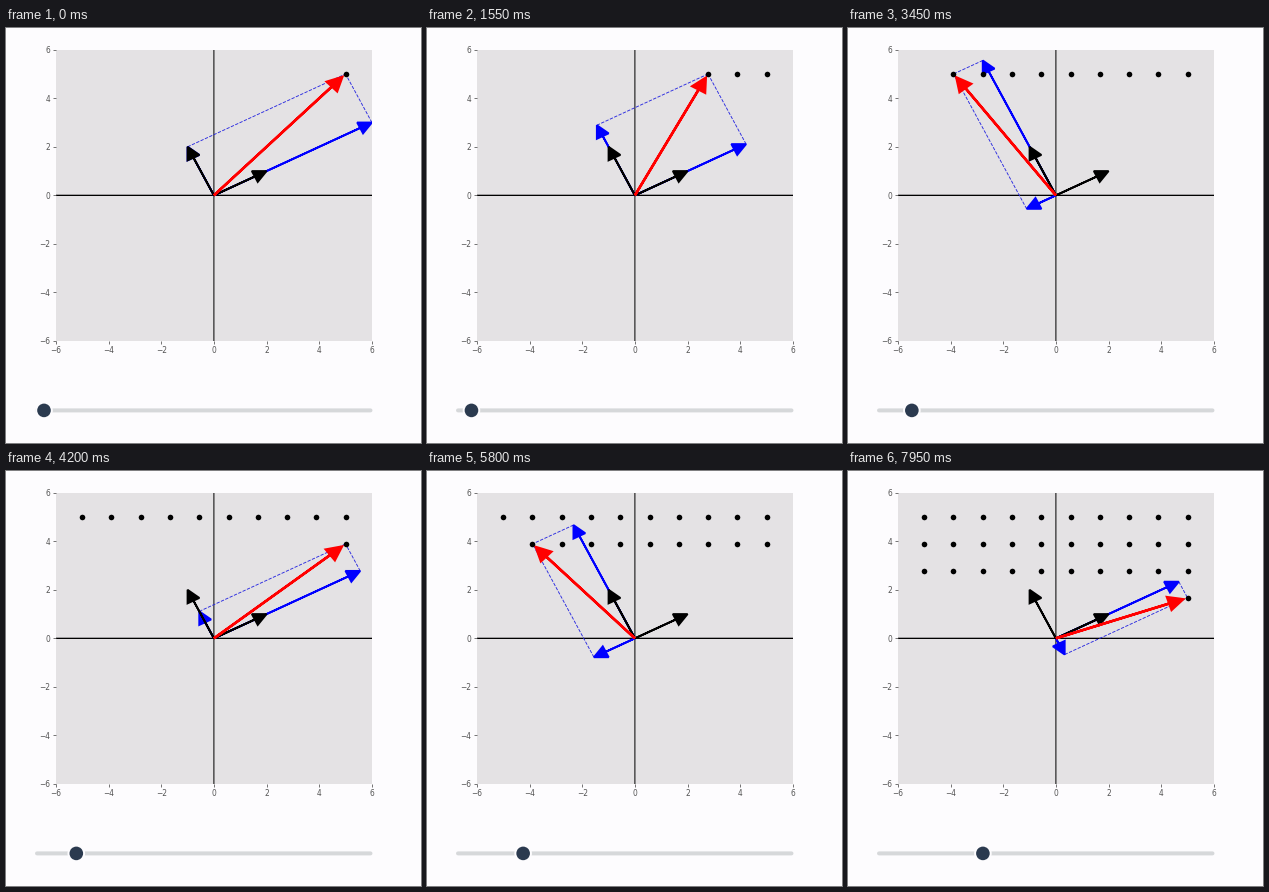
Write a matplotlib script that moves like this. It is 415 px wide and 415 px high and loops after 8000 ms.

```python
import numpy as np
import matplotlib.pyplot as plt
from matplotlib.animation import FuncAnimation
from matplotlib.patches import Circle, Polygon

SIZE, DPI = 415, 80
PX = 72 / DPI  # points per pixel
BACK = "#fdfcfe"
FRAMES, STEP = 160, 50

U, V = np.array([2.0, 1.0]), np.array([-1.0, 2.0])
side = np.linspace(5, -5, 10)
GRID = np.array([(x, y) for y in side for x in side])

# Slider progress: time in ms -> index of the current grid point
TIMES = [0, 750, 1650, 2600, 4200, 5100, 5800, 5950, 6750, 7650, 7850]
INDEX = [0, 1, 3, 6, 10, 13, 18, 19, 23, 29, 30]

fig = plt.figure(figsize=(SIZE / DPI, SIZE / DPI), dpi=DPI, facecolor=BACK)

# Whole-stage layer in pixel coordinates for the slider
stage = fig.add_axes([0, 0, 1, 1])
stage.set(xlim=(0, SIZE), ylim=(SIZE, 0))
stage.axis("off")

ax = fig.add_axes([49.9 / SIZE, 1 - 313.0 / SIZE, 316.0 / SIZE, 291.3 / SIZE])
ax.set(xlim=(-6, 6), ylim=(-6, 6), facecolor="#e4e2e4",
       xticks=range(-6, 7, 2), yticks=range(-6, 7, 2))
for spine in ax.spines.values():
    spine.set_visible(False)
ax.tick_params(length=3 * PX, width=0.8 * PX, color="#555555",
               labelcolor="#555555", labelsize=7.5 * PX, pad=2.4 * PX)
ax.axhline(0, color="black", lw=1.3 * PX, zorder=1, snap=False)
ax.axvline(0, color="black", lw=1.0 * PX, zorder=1, snap=False)


def arrow_points(end, head, gap=0.0):
    """Outline of an arrow from the origin, stopping `gap` short of end."""
    along = end / np.hypot(*end)
    across = np.array([-along[1], along[0]]) * head / 2
    tip = end - along * gap
    neck = tip - along * head
    return np.array([(0, 0), neck, neck + across, tip, neck - across, neck])


def add_arrow(color, width, z, end=U):
    patch = Polygon(arrow_points(end, 0.5), closed=True, facecolor=color,
                    edgecolor=color, lw=width * PX, joinstyle="miter", zorder=z)
    return ax.add_patch(patch)


def add_dashes():
    return ax.plot([], [], "--", color="#2a2ae0", lw=0.9 * PX, zorder=2)[0]


blue_u = add_arrow("blue", 1.9, 3)
blue_v = add_arrow("blue", 1.9, 3)
add_arrow("black", 1.9, 4, U)
add_arrow("black", 1.9, 4, V)
red = add_arrow("red", 2.5, 5)
dash_u, dash_v = add_dashes(), add_dashes()
dots, = ax.plot([], [], "o", color="black", ms=5.6 * PX, mew=0, zorder=6,
                snap=False)

stage.plot([31, 364.5], [382.4, 382.4], color="#d6d8da", lw=4 * PX,
           solid_capstyle="round", snap=False)
halo = stage.add_patch(Circle((38, 382.4), 8.8, color=BACK, lw=0, zorder=3))
knob = stage.add_patch(Circle((38, 382.4), 6.8, color="#2b3a4f", lw=0, zorder=4))


def update(frame):
    k = int(np.interp(frame * STEP, TIMES, INDEX) + 1e-6)
    point = GRID[k]
    part_u = U * (point @ U) / 5
    part_v = V * (point @ V) / 5
    blue_u.set_xy(arrow_points(part_u, 0.5))
    blue_v.set_xy(arrow_points(part_v, 0.5))
    red.set_xy(arrow_points(point, 0.55, 0.18))
    dash_u.set_data(*zip(part_u, point))
    dash_v.set_data(*zip(part_v, point))
    dots.set_data(*GRID[:k + 1].T)
    for disc in (halo, knob):
        disc.center = (38 + 3.23 * k, 382.4)
    return blue_u, blue_v, red, dash_u, dash_v, dots, halo, knob


anim = FuncAnimation(fig, update, frames=FRAMES, interval=STEP, repeat=True,
                     repeat_delay=0, blit=False)
plt.show()
```
